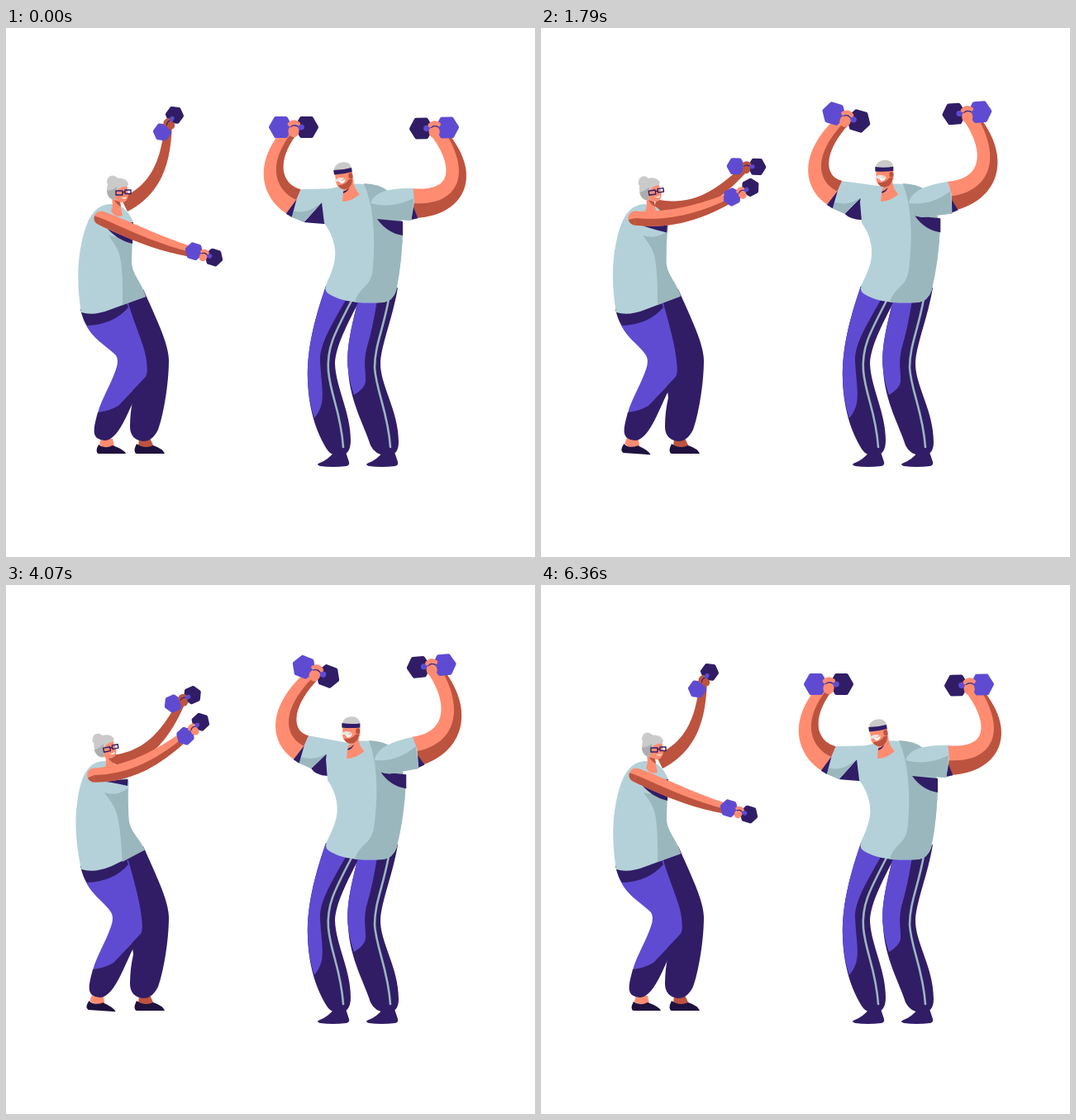
An HTML page with a canvas for the animation above (6.43 s loop, 640x640 px).

```html
<!DOCTYPE html>
<html lang="en">
<head>
<meta charset="utf-8">
<title>Dumbbell exercise</title>
<style>
html, body { margin: 0; width: 100%; height: 100%; overflow: hidden; background: #fff; }
canvas { display: block; }
</style>
</head>
<body>
<canvas id="stage" width="640" height="640"></canvas>
<script>
const ctx = document.getElementById('stage').getContext('2d');
const PURPLE = '#5f4bd2', NAVY = '#301d66', SHOE = '#20123f';
const SHIRT = '#b4d1d9', SHIRT_SHADE = '#9ab7bd';
const SKIN = '#ff8c70', SKIN_SHADE = '#bc533f';
const HAIR = '#cacaca', HAIR_SHADE = '#adadad';
const LOOP = 6430, STEP = LOOP / 90, WOMAN_CYCLE = LOOP / 2, MAN_CYCLE = 2380;

const mix = (a, b, u) => a + (b - a) * u;
const mixPoint = (a, b, u) => [mix(a[0], b[0], u), mix(a[1], b[1], u)];

function ease(time, from, to) {
  const u = Math.min(1, Math.max(0, (time - from) / (to - from)));
  return u * u * (3 - 2 * u);
}

function fill(color, d) {
  ctx.fillStyle = color;
  ctx.fill(new Path2D(d));
}

function stroke(color, width, d) {
  ctx.strokeStyle = color;
  ctx.lineWidth = width;
  ctx.lineCap = ctx.lineJoin = 'round';
  ctx.stroke(new Path2D(d));
}

function disc(color, x, y, rx, ry = rx) {
  ctx.fillStyle = color;
  ctx.beginPath();
  ctx.ellipse(x, y, rx, ry, 0, 0, 7);
  ctx.fill();
}

function polygon(color, points) {
  fill(color, 'M' + points.join('L') + 'Z');
}

function placed(x, y, angle, draw) {
  ctx.save();
  ctx.translate(x, y);
  ctx.rotate(angle);
  draw();
  ctx.restore();
}

function sheared(lean, base, height, draw) {
  ctx.save();
  ctx.transform(1, 0, -lean / height, 1, lean * base / height, 0);
  draw();
  ctx.restore();
}

// Tapered ribbon along a cubic curve; shade(t) is where the dark side begins, from -1 to 1.
function limb({ path: [p0, p1, p2, p3] }, { from, to, bulge = 0, color = SKIN, shade }) {
  const edge = side => Array.from({ length: 31 }, (_, i) => {
    const t = i / 30, s = 1 - t;
    const point = c => s * s * s * p0[c] + 3 * s * s * t * p1[c] + 3 * s * t * t * p2[c] + t * t * t * p3[c];
    const rate = c => s * s * (p1[c] - p0[c]) + 2 * s * t * (p2[c] - p1[c]) + t * t * (p3[c] - p2[c]);
    const dx = rate(0), dy = rate(1);
    const w = side(t) * (mix(from, to, t) + 4 * bulge * t * s) / Math.hypot(dx, dy);
    return [point(0) - dy * w, point(1) + dx * w];
  });
  const outer = edge(() => 1).reverse();
  polygon(color, [...edge(() => -1), ...outer]);
  if (shade) polygon(SKIN_SHADE, [...edge(shade), ...outer]);
}

function dumbbell({ path, grip }, r, half, skin) {
  const hexagon = (color, x) => {
    const points = Array.from({ length: 6 }, (_, i) =>
      [x + r * Math.cos(i * Math.PI / 3), r * Math.sin(i * Math.PI / 3)]);
    polygon(color, points);
    stroke(color, 5, 'M' + points.join('L') + 'Z');
  };
  const [x, y] = path[3];
  placed(x, y, grip, () => {
    hexagon(NAVY, half);
    hexagon(PURPLE, -half);
    stroke(PURPLE, r * .6, `M0 0H${half * .6}`);
  });
  placed(x, y, Math.cos(grip) < 0 ? grip + Math.PI : grip, () => {
    disc(skin, 0, r * .4, r * .55, r * .6);
    stroke(skin, r * .42, `M${-r * .4} ${-r * .3}Q0 ${-r * .7} ${r * .45} ${-r * .35}`);
    stroke(NAVY, 1, `M${-r * .3} ${-r * .05}Q0 ${-r * .3} ${r * .4} ${-r * .1}`);
  });
}

// Returns a function that gives points relative to the cuff of a sleeve.
function cuff({ path: [[x, y], [x1, y1]] }) {
  const length = Math.hypot(x1 - x, y1 - y), dx = (x1 - x) / length, dy = (y1 - y) / length;
  return (across, along = 0) => [x - dy * across + dx * along, y + dx * across + dy * along];
}

function manLegs() {
  fill(NAVY, 'M387 312C372 356 364 390 365 425C366 465 378 495 390 512Q394 517 402 517Q417 518 417 499C417 465 399 435 398 406C399 385 412 360 428 329Z');
  fill(PURPLE, 'M387 312C372 356 364 390 365 425Q366 452 373 472C388 454 382 440 380 403C379 382 396 356 411 329Z');
  stroke(SHIRT_SHADE, 2.6, 'M418 330C396 372 388 388 390 415C393 446 405 464 408 507');
  fill(NAVY, 'M426 329C418 362 411 388 414 414C416 452 434 482 441 505Q447 517 460 517Q475 518 475 501C475 462 452 432 453 404C455 380 468 350 474 314Z');
  fill(PURPLE, 'M426 329C418 362 411 388 414 414Q416 430 421 444Q434 436 435 428C436 416 432 408 436 389Q444 362 449 329Z');
  stroke(SHIRT_SHADE, 2.6, 'M463 328C456 366 446 385 446 411C448 440 462 464 465 507');
  for (const x of [0, 59]) placed(x, 0, 0, () =>
    fill(NAVY, 'M397 513H411L415 525Q416 529 412 530Q395 532 380 530Q374 528 380 526Q390 522 397 513Z'));
}

function manHead() {
  fill(HAIR, 'M-11 1C-11 -7 -5 -11 2 -10.5C8 -10 11 -6 11 -1Z');
  fill(SKIN, 'M-10 2L-10 13Q-9 21 0 22Q8 20 11 12V2Z');
  fill(SKIN_SHADE, 'M-8 16Q0 18 6 11L10 11Q9 20 2 22Q-6 23 -8 16Z');
  disc(SKIN_SHADE, 8.5, 7, 2.6, 3.6);
  fill('#e9e6e4', 'M-12 11Q-7 5 1 9Q-4 13 -12 11Z');
  fill('#fff', 'M-7 11Q-1 13 2 9Q1 15 -4 15Z');
  fill(NAVY, 'M-11 -2.5Q0 -1 11 -2.5V2.5Q0 4 -11 3Z');
}

function drawMan(time) {
  const lift = ease(time, 220, 950) - ease(time, 1300, 2300);
  const lean = 9 * lift;
  const between = (rest, raised) => rest.map((p, i) => mixPoint(p, raised[i], lift));
  const left = {
    path: between([[350, 211], [324, 200], [308, 165], [348, 120]], [[364, 191], [340, 180], [333, 144], [389, 97]]),
    grip: .56 * lift
  };
  const right = {
    path: between([[491, 212], [547, 214], [564, 173], [518, 121]], [[497, 196], [538, 180], [551, 136], [513, 86]]),
    grip: Math.PI - .03 - .09 * lift
  };
  const at = (x, y) => [x + lean * (330 - y) / 140, y];
  const l = cuff(left), r = cuff(right);
  const pit = at(382, 211 - lean * 1.1);

  manLegs();
  limb(left, { from: 17, to: 8, shade: t => .2 + .1 * t });
  dumbbell(left, 12, 15.5, SKIN);
  limb(right, { from: 18, to: 8.5, shade: t => .4 * t + .6 * t ** 6 });
  dumbbell(right, 12, 15.5, SKIN);

  fill(NAVY, `M${pit}L${l(-18, -19)}Q${at(370, 236 - lean)} ${at(385, 237 - lean)}L${at(400, 236)}L${at(395, 205)}Z`);
  sheared(lean, 330, 140, () => {
    fill(SHIRT, 'M383 197L409 190Q431 186 453 193L480 236Q480 280 472 318Q468 330 457 332Q412 335 391 322Q385 319 387 311C398 288 400 276 397 262Q394 248 385 236L382 211Z');
    fill(SHIRT_SHADE, 'M433 188Q453 189 462 197L480 236Q480 280 472 318Q468 330 457 332L422 332Q423 323 436 311Q443 304 444 290Q449 226 433 188Z');
  });

  polygon(SHIRT, [l(17), at(405, 194 - lean * .6), at(402, 214), pit, l(-18, -19), l(-18)]);
  fill(SHIRT_SHADE, `M${l(-18)}L${l(-18, -19)}L${pit}Q${l(-8, -19)} ${l(-10, -3)}Z`);
  polygon(NAVY, [l(4), l(-17, 5), l(-18, -3)]);

  const tip = at(441, 212), drop = 231 - lean * .8;
  fill(NAVY, `M${at(449, drop)}L${at(480, drop + 3)}V${drop + 20}Q${at(461, drop + 17)} ${at(449, drop)}Z`);
  const lower = `Q${at(443, 229)} ${r(20, -35)}L${r(21)}`;
  polygon(NAVY, [r(0), r(18, 8), r(20)]);
  fill(SHIRT, `M${r(-18, 1)}Q${r(-18, -45)} ${tip}${lower}L${r(-2, 3)}Z`);
  fill(SHIRT_SHADE, `M${tip}${lower}L${r(-6, 2)}Q${r(8, -24)} ${tip}Z`);

  sheared(lean, 330, 140, () => {
    fill(SKIN, 'M408 195L420 183Q421 195 428 201Q418 210 407 210Z');
    fill(NAVY, 'M408 198Q412 197 415 193Q414 198 408 200Z');
  });
  placed(mix(407.5, 422.5, lift), mix(173, 168, lift), mix(-.14, .1, lift), manHead);
}

function womanLegs(step) {
  const x = v => v - 6 * step;
  fill(SKIN_SHADE, 'M161 496H174L179 507H160Z');
  fill(SHOE, 'M158 503Q168 510 178 505Q190 509 192 515H158Q153 513 158 503Z');
  placed(127 - 12 * step, 508, .07 * step, () => {
    fill(SKIN, 'M-12 -11H2L4 -2L-8 0L-14 -4Z');
    fill(SHOE, 'M-15 -4Q-8 2 2 -3Q16 2 18 7H-15Q-20 5 -15 -4Z');
  });
  fill(NAVY, 'M140 335L166 316C181 350 197 382 197 402C197 432 190 470 184 486Q177 500 166 500Q150 498 150 482Q150 465 154 447Z');
  const thigh = `M91 343C98 374 118 381 ${x(133)} 396Q${x(137)} 402 ${x(133)} 413`;
  const knee = `Q${x(172)} 417 ${x(170)} 403C${x(169)} 387 155 358 148 333Z`;
  fill(PURPLE, `${thigh}C${x(127)} 431 ${x(115)} 450 ${x(111)} 466L${x(134)} 460L${x(169)} 422${knee}`);
  fill(NAVY, `M${x(111)} 465Q${x(126)} 463 ${x(136)} 457L${x(169)} 422Q${x(157)} 444 ${x(148)} 465Q${x(138)} 487 ${x(130)} 494Q${x(121)} 503 ${x(110)} 496C${x(104)} 491 ${x(107)} 480 ${x(111)} 465Z`);
  fill(NAVY, 'M90 340Q93 353 98 360Q130 359 148 338L144 328Z');
}

function womanHead() {
  fill(SKIN, 'M-5 0L11 -5L13 9Q12 18 5 18Q-2 17 -5 12Z');
  fill(HAIR, 'M-13 3Q-13 -8 -3 -11Q9 -13 13 -5Q13 -1 8 -1Q0 0 -1 6L-4 15Q-13 14 -13 3Z');
  fill(HAIR_SHADE, 'M-13 4Q-5 3 -1 -1L-1 6L-4 15Q-12 13 -13 4Z');
  disc(HAIR, -6, -9, 6.2, 5.6);
  disc(HAIR, -9, -7, 4);
  stroke(NAVY, 1.4, 'M-2 4H6V9H-2ZM9 3H16V7.5H9ZM6 6L9 5');
  fill('#fff', 'M4 12Q9 13 11 11Q10 16 4 12Z');
}

// Arm swung about its shoulder; sags push its two bends to the dark side. Angles in degrees.
function swungArm(x, y, degrees, reach, sags, gripDegrees) {
  const angle = degrees * Math.PI / 180, dx = Math.cos(angle), dy = Math.sin(angle);
  const point = (along, sag) => [x + dx * along * reach - dy * sag, y + dy * along * reach + dx * sag];
  return {
    path: [[x, y], point(.3, sags[0]), point(.6, sags[1]), point(1, 0)],
    grip: gripDegrees * Math.PI / 180,
    angle
  };
}

function drawWoman(time) {
  const raise = ease(time, 0, 800) - ease(time, 1200, 2980);
  const reach = ease(time, 200, 1450) - ease(time, 1790, 2960);
  const step = ease(time, 150, 900) - ease(time, 1790, 2960);
  const lean = -12 * raise + 8 * reach;
  const headX = 135 + 2 * lean - 1.5 * reach;
  const frontAngle = mix(19.4, -25, raise), backAngle = mix(-61.5, -23.6, reach);
  const front = swungArm(115 + 1.1 * lean, 230, frontAngle, 132,
    [8.5 - .34 * frontAngle, 11 - .16 * frontAngle], 1.35 * frontAngle - 9);
  const back = swungArm(headX + 8 - 2 * reach, 214 + 2 * reach, backAngle, mix(112, 121, reach),
    [24, 21], 1.46 * backAngle + 36);

  limb(back, { from: 9, to: 4.5, color: SKIN_SHADE });
  dumbbell(back, 8.6, 12.7, SKIN_SHADE);
  womanLegs(step);
  sheared(lean, 340, 125, () => {
    const hem = 325 + lean * .6;
    fill(SHIRT, `M126 213C103 214 96 239 91 262C86 286 86 315 91 344Q106 349 128 340L169 ${hem}C164 307 152 298 152 283C151 265 154 250 155 239Q152 224 137 214Z`);
    fill(SHIRT_SHADE, `M124 251Q140 256 153 246L152 283C152 298 164 307 169 ${hem}L141 335Q142 282 135 268Q131 260 124 251Z`);
    const opening = 261 - 18 * raise;
    fill(NAVY, `M118 237Q132 ${opening - 5} 153 ${opening}L154 235Z`);
    fill(SKIN, 'M128 205Q130 216 127 221Q132 230 141 227L138 212Z');
    fill(SKIN_SHADE, 'M131 208Q134 214 139 216L138 210Z');
  });
  placed(headX, 193, -.2 * raise, womanHead);

  const [shoulderX, shoulderY] = front.path[0];
  disc(SKIN, shoulderX, shoulderY, 8.5);
  ctx.fillStyle = SKIN_SHADE;
  ctx.beginPath();
  ctx.arc(shoulderX, shoulderY, 8.5, front.angle, front.angle + Math.PI);
  ctx.fill();
  limb(front, { from: 8.5, to: 5, bulge: 2.2, shade: t => .1 * t });
  dumbbell(front, 8.6, 12.5, SKIN);
}

const start = performance.now();

function frame() {
  const elapsed = (performance.now() - start) % LOOP;
  const time = Math.floor(elapsed / STEP + .1) * STEP % LOOP;
  ctx.fillStyle = '#fff';
  ctx.fillRect(0, 0, 640, 640);
  drawWoman(time % WOMAN_CYCLE);
  drawMan(time < 2 * MAN_CYCLE ? time % MAN_CYCLE : 0);
  requestAnimationFrame(frame);
}
frame();
</script>
</body>
</html>
```
